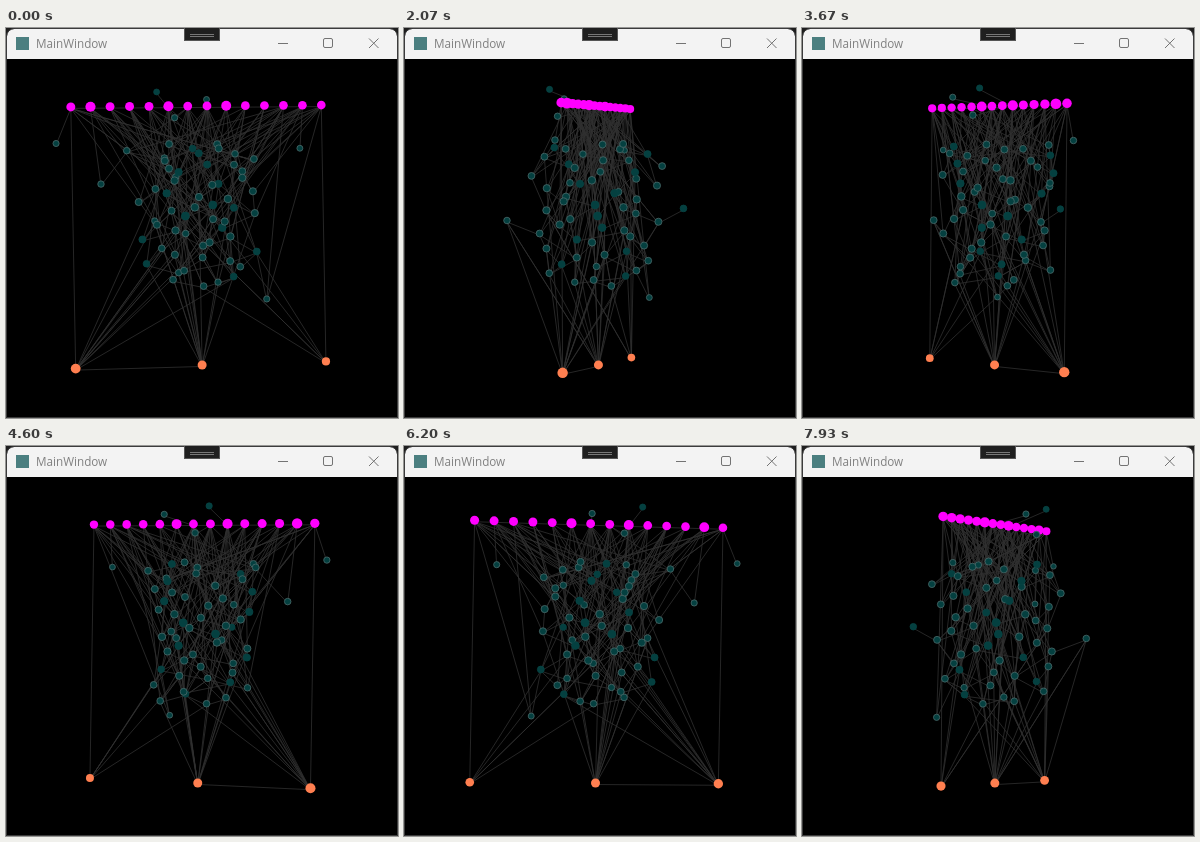
These frames come from a looping animation (392 px wide and 390 px high, 8000 ms). An HTML page with a canvas:

```html
<!DOCTYPE html>
<html lang="en">
<head>
<meta charset="utf-8">
<title>MainWindow</title>
<style>
  html, body { margin: 0; width: 100%; height: 100%; overflow: hidden; background: #1e1e1e; }
  canvas { display: block; }
</style>
</head>
<body>
<canvas id="stage" width="392" height="390"></canvas>
<script>
const ctx = document.getElementById('stage').getContext('2d');
const LOOP = 8000, STEP = 200 / 3;
const CENTER_X = 193.8, CENTER_Y = 207.5, CAMERA = 3000;
const START_ANGLE = 14, ANGLE_PER_STEP = 1.953;
const GOLDEN_ANGLE = Math.PI * (3 - Math.sqrt(5));
const CLOUD_SIZE = 54;

let seed = 11;
const random = () => (seed = (seed * 16807) % 2147483647) / 2147483647;
const pick = list => list[Math.floor(random() * list.length)];

const nodes = [], edges = [];
const link = (a, b) => edges.push([a, b]);
const addNode = (x, y, z, radius, color, outline) => {
  const node = { x, y, z, radius, color, outline };
  nodes.push(node);
  return node;
};

// Two slightly tilted rows: 14 inputs above, 3 outputs below
const inputs = Array.from({ length: 14 }, (_, i) => {
  const u = i / 6.5 - 1;
  return addNode(129 * u - 2.5, -129.5 - 2.25 * u, 0, [1, 5, 8].includes(i) ? 5 : 4.4, '#ff00ff');
});
const outputs = [-1, 0, 1].map(u =>
  addNode(129 * u + 2.4, 129.5 - 2.25 * u, 0, 4.5 - 0.3 * u, '#ff7f50'));

const addHidden = (x, y, z) => {
  const reach = Math.hypot(x, y + 30, z);
  const outline = nodes.length % 4 ? '#4c6a6a' : '#084444';
  return addNode(x, y, z, Math.max(3, 4.1 - reach * 0.009), '#044040', outline);
};

// The few nodes that stick out of the cloud
const hidden = [
  [-146, -91, -2], [104, -88, 0], [-101, -51, 0],
  [-35, -145, -40], [17, -138, -40], [-17, -119, -37],
  [-26, -15, -87], [13, -27, 85], [59, 63, 38]
].map(point => addHidden(...point));

// The cloud: a spiral that narrows downwards
for (let i = 0; i < CLOUD_SIZE; i++) {
  const y = -92 + 144 * ((i + 0.5) / CLOUD_SIZE) ** 1.2;
  const reach = (80 - 0.2 * (y + 92)) * Math.sqrt(0.05 + 0.95 * random());
  const angle = i * GOLDEN_ANGLE;
  hidden.push(addHidden(reach * Math.cos(angle), y, reach * Math.sin(angle)));
}

const distance = (a, b) => Math.hypot(a.x - b.x, a.y - b.y, a.z - b.z);
const byDistance = (list, node) =>
  list.filter(other => other !== node).sort((a, b) => distance(a, node) - distance(b, node));

hidden.forEach((node, i) => {
  const near = byDistance(hidden, node);
  const outer = Math.hypot(node.x, node.z) > 74 || node.y < -100;
  if (outer) {
    link(node, node.y < -45 ? byDistance(inputs, node)[0] : near[0]);
    return;
  }
  link(node, pick(inputs));
  link(node, pick(inputs));
  link(node, near[1]);
  if (i % 2) link(node, near[5]);
});
const inner = hidden.filter(node => Math.abs(node.x) < 62 && node.y > -75);
outputs.forEach((output, i) => {
  for (let k = 0; k < 11 - 3 * i * (i - 1); k++) link(output, pick(inner));
});
link(outputs[0], inputs[0]);
link(outputs[0], outputs[1]);
link(outputs[1], inputs[5]);
link(outputs[1], inputs[9]);
link(outputs[2], inputs[13]);
link(inputs[0], inputs[13]);

function project(node, cos, sin) {
  node.depth = node.z * cos - node.x * sin;
  const scale = 1 / (1 - node.depth / CAMERA);
  node.sx = CENTER_X + (node.x * cos + node.z * sin) * scale;
  node.sy = CENTER_Y + node.y * scale;
}

function line(...points) {
  ctx.beginPath();
  for (let i = 0; i < points.length; i += 2) ctx.lineTo(points[i], points[i + 1]);
  ctx.stroke();
}

function drawWindow() {
  ctx.fillStyle = '#1e1e1e';
  ctx.fillRect(0, 0, 392, 390);
  ctx.fillStyle = '#f3f3f3';
  ctx.beginPath();
  ctx.roundRect(1, 1, 390, 40, [7, 7, 0, 0]);
  ctx.fill();
  ctx.fillStyle = '#000';
  ctx.fillRect(1, 31, 390, 358);
  ctx.strokeStyle = '#3c3c3c';
  ctx.lineWidth = 1;
  ctx.beginPath();
  ctx.roundRect(0.5, 0.5, 391, 389, [8, 8, 0, 0]);
  ctx.stroke();

  ctx.fillStyle = '#4b7f80';
  ctx.fillRect(10, 9, 13, 13);
  ctx.fillStyle = '#808080';
  ctx.font = '11.7px "Open Sans", "Noto Sans", sans-serif';
  ctx.fillText('MainWindow', 30, 20);

  ctx.strokeStyle = '#737373';
  line(272, 15.5, 282, 15.5);
  ctx.beginPath();
  ctx.roundRect(317.5, 10.5, 9, 9, 1.5);
  ctx.stroke();
  line(363, 10.5, 372.5, 20);
  line(372.5, 10.5, 363, 20);

  ctx.fillStyle = '#1f1f1f';
  ctx.fillRect(178, 0, 36, 13);
  ctx.strokeStyle = '#555';
  ctx.strokeRect(178.5, -0.5, 35, 13);
  ctx.strokeStyle = '#777';
  line(184, 6.5, 208, 6.5);
  line(184, 8.5, 208, 8.5);
}

function drawGraph(step) {
  const angle = (START_ANGLE + ANGLE_PER_STEP * step) * Math.PI / 180;
  const cos = Math.cos(angle), sin = Math.sin(angle);
  nodes.forEach(node => project(node, cos, sin));

  ctx.strokeStyle = '#303030';
  ctx.lineWidth = 0.8;
  edges.forEach(([a, b]) => line(a.sx, a.sy + 1.5, b.sx, b.sy + 1.5));

  for (const node of [...nodes].sort((a, b) => a.depth - b.depth)) {
    ctx.beginPath();
    ctx.arc(node.sx, node.sy, node.radius * (1 + node.depth / 1400), 0, Math.PI * 2);
    ctx.fillStyle = node.color;
    ctx.fill();
    if (node.outline) {
      ctx.strokeStyle = node.outline;
      ctx.stroke();
    }
  }
}

function render() {
  const time = performance.now() % LOOP;
  drawWindow();
  drawGraph(Math.floor((time + 3.4) / STEP) % 120);
  requestAnimationFrame(render);
}
render();
</script>
</body>
</html>
```
